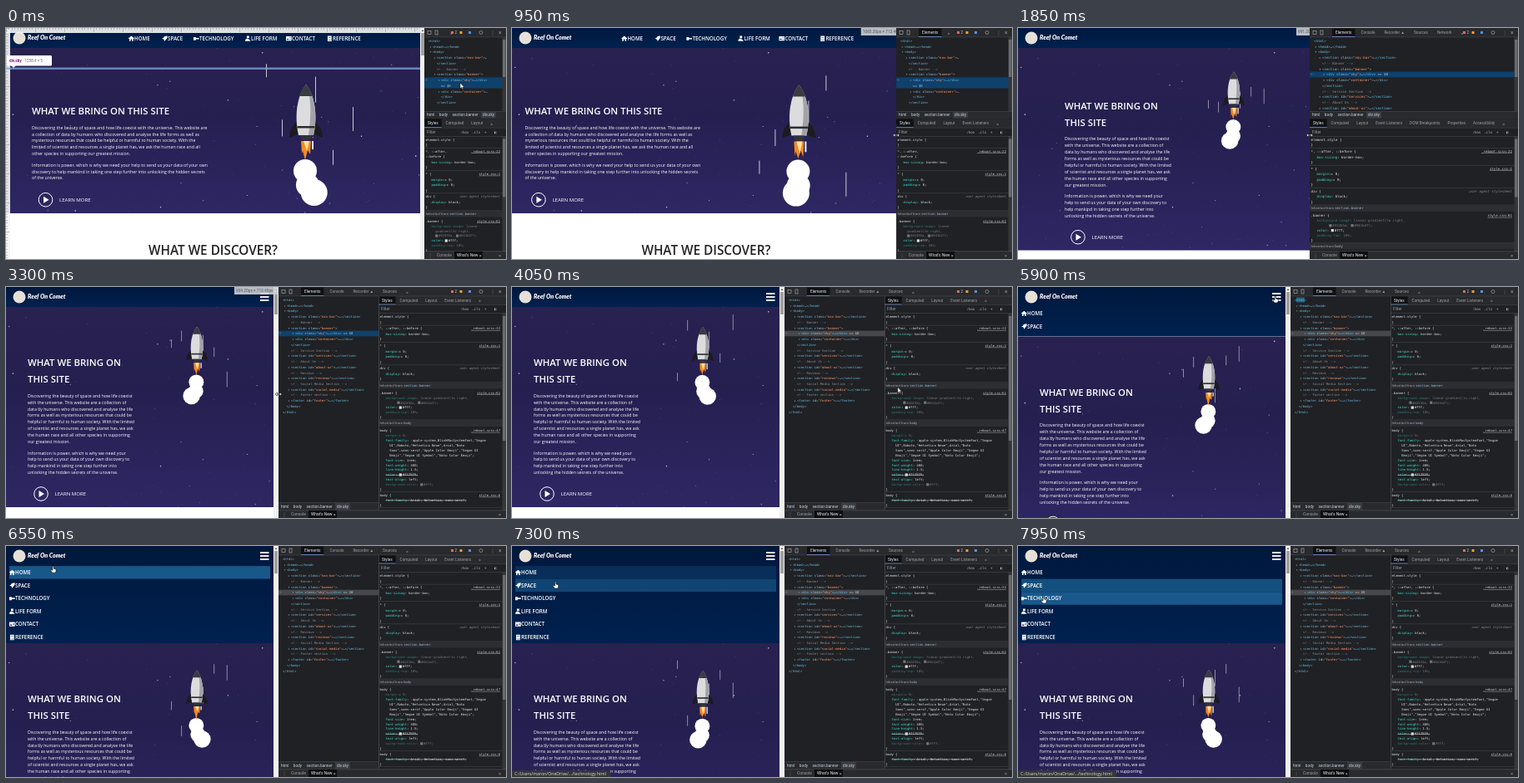
Recreate the animation shown at these times as an HTML page with a canvas. Size 600 by 278 pixels, loop 8 s.

```html
<!DOCTYPE html>
<html lang="en">
<head>
<meta charset="utf-8">
<title>Responsive space site</title>
<style>
html, body { margin: 0; width: 100%; height: 100%; overflow: hidden; background: #fff; }
canvas { display: block; width: 600px; height: 278px; }
</style>
</head>
<body>
<canvas id="stage"></canvas>
<script>
const LOOP = 8000, W = 600, H = 278;
const SANS = '"Open Sans", "Noto Sans", sans-serif';
const UI = 'Roboto, "Open Sans", sans-serif';
const MONO = '"DejaVu Sans Mono", monospace';
const canvas = document.getElementById('stage');
const c = canvas.getContext('2d');
const ratio = window.devicePixelRatio || 1;
canvas.width = W * ratio;
canvas.height = H * ratio;

// ---------- helpers ----------
const clamp = v => Math.max(0, Math.min(1, v));
const smooth = v => { v = clamp(v); return v * v * (3 - 2 * v); };
const during = (t, a, b) => t >= a && t < b;

function track(t, keys, ease = v => v) {
  if (t <= keys[0][0]) return keys[0][1];
  for (let i = 1; i < keys.length; i++) {
    const [t0, v0] = keys[i - 1], [t1, v1] = keys[i];
    if (t < t1) return v0 + (v1 - v0) * ease((t - t0) / (t1 - t0));
  }
  return keys[keys.length - 1][1];
}

function rect(x, y, w, h, fill) {
  c.fillStyle = fill;
  c.fillRect(x, y, w, h);
}

function circle(x, y, r, fill) {
  c.fillStyle = fill;
  c.beginPath();
  c.arc(x, y, r, 0, 7);
  c.fill();
}

function shape(path, fill) {
  c.fillStyle = fill;
  c.fill(new Path2D(path));
}

// Draws text centred on y and returns its width.
function text(s, x, y, font, fill, align = 'left') {
  c.font = font;
  c.fillStyle = fill;
  c.textAlign = align;
  c.textBaseline = 'alphabetic';
  c.fillText(s, x, y + parseFloat(font.match(/[\d.]+px/)) * .36);
  return c.measureText(s).width;
}

function clipped(x, y, w, h, draw) {
  c.save();
  c.beginPath();
  c.rect(x, y, w, h);
  c.clip();
  draw();
  c.restore();
}

let seed = 11;
const random = () => (seed = seed * 16807 % 2147483647) / 2147483647;
const stars = Array.from({ length: 170 }, () => ({
  x: random() * 500, y: random() * 245, r: .2 + random() ** 4 * .7, a: .3 + random() * .6
}));

// ---------- web page ----------
const NAV = ['HOME', 'SPACE', 'TECHNOLOGY', 'LIFE FORM', 'CONTACT', 'REFERENCE'];
const NAV_X = [147, 187, 225, 287, 336, 385];
const ICONS = [
  'M0 3L3.5 0L7 3V3.6H6V6.5H4.3V4.3H2.7V6.5H1V3.6H0Z',
  'M7 0Q3 0 2 2.5L0 3.2L2 4.2L3 5L3.7 7L4.7 5Q7 4 7 0Z',
  'M0 1.5H3V2.6H7V4.2H3V5.5H0Z',
  'M2 0H5V3H2ZM0 6.5Q0 3.5 3 3.5L5 4.5L7 6.5Z',
  'M0 .5H7V6H0ZM1 4.8H3.4V3.6H1ZM4.3 2V2.6H6V2ZM4.3 3.6V4.2H6V3.6Z',
  'M1 0H6V6.8H1ZM2 1.5V2.2H5V1.5ZM2 5.2V5.8H5.4V5.2Z'
];
const WIDE_COPY = [
  'Discovering the beauty of space and how life coexist with the universe. This website are|a collection of data by humans who discovered and analyse the life forms as well as|mysterious resources that could be helpful or harmful to human society. With the|limited of scientist and resources a single planet has, we ask the human race and all|other species in supporting our greatest mission.',
  'Information is power, which is why we need your help to send us your data of your own|discovery to help mankind in taking one step further into unlocking the hidden secrets|of the universe.'
];
const NARROW_COPY = [
  'Discovering the beauty of space and how life coexist|with the universe. This website are a collection of|data by humans who discovered and analyse the life|forms as well as mysterious resources that could be|helpful or harmful to human society. With the limited|of scientist and resources a single planet has, we ask|the human race and all other species in supporting|our greatest mission.',
  'Information is power, which is why we need your|help to send us your data of your own discovery to|help mankind in taking one step further into|unlocking the hidden secrets of the universe.'
];

function navItem(i, x, y) {
  c.save();
  c.translate(x, y - 3);
  c.scale(.95, .95);
  c.fillStyle = '#fff';
  c.fill(new Path2D(ICONS[i]), 'evenodd');
  c.restore();
  text(NAV[i], x + 7, y, `600 6.2px ${SANS}`, '#fff');
}

function rocket(x, y, scale, t) {
  const sway = Math.cos((t - 6550) / 1300 * 2 * Math.PI);
  const flick = Math.sin(t / 35) * 3;
  c.save();
  c.translate(x, y);
  c.scale(scale, scale);
  [312, 416, 392, 371, 331].forEach((lineX, i) => {
    const length = 16 + i * 13 % 24;
    const fall = (t / (520 + i * 90) + i * .37) % 1;
    rect(lineX - 360, fall * 140 - 25, 1, length, 'rgba(255,255,255,.75)');
  });
  circle(-1, 104, 14, '#fff');
  circle(10 * sway, 130, 16, '#fff');
  circle(2 * sway, 121, 14, '#fff');
  shape(`M-6 68H6L5 ${84 + flick}L2 79L-1 ${91 - flick}L-4 80L-5 ${83 + flick}Z`, '#f58a1f');
  shape(`M-3 68H4L1 ${80 + flick}Z`, '#ffe2a6');
  rect(7, 68, 2, 10 + flick, '#eee');
  shape('M-9 43Q-20 51 -20 64L-8 59ZM9 43Q20 51 20 64L8 59Z', '#1b1b20');
  shape('M0 0C-9 11 -15 34 -9 61H9C15 34 9 11 0 0Z', '#dcdcde');
  shape('M0 0C9 11 15 34 9 61H3C7 35 6 12 0 0Z', '#a2a2a8');
  shape('M0 0C-4 5 -6 9 -7.5 14H7.5C6 9 4 5 0 0Z', '#3a3a40');
  rect(-10.5, 50, 21, 2.5, '#2a2a30');
  shape('M-7 61H7L5 67H-5Z', '#333338');
  c.restore();
}

function copy(blocks, x, y) {
  for (const block of blocks) {
    for (const line of block.split('|')) {
      text(line, x, y, `5.2px ${SANS}`, '#fff');
      y += 7.93;
    }
    y += 5.4;
  }
}

function learnMore(x, y) {
  c.strokeStyle = '#fff';
  c.lineWidth = 1;
  c.beginPath();
  c.arc(x, y, 8.3, 0, 7);
  c.stroke();
  shape(`M${x - 2.5} ${y - 4}L${x + 4} ${y}L${x - 2.5} ${y + 4}Z`, '#fff');
  text('LEARN MORE', x + 16.5, y, `6.1px ${SANS}`, '#fff');
}

function sky(width, top, bottom) {
  const g = c.createLinearGradient(0, top, 0, bottom);
  g.addColorStop(0, '#292150');
  g.addColorStop(.4, '#251f50');
  g.addColorStop(1, '#2e2763');
  clipped(0, top, width, bottom - top, () => {
    rect(0, top, width, bottom - top, g);
    for (const s of stars) circle(s.x, top + s.y, s.r, `rgba(235,230,255,${s.a})`);
  });
}

function navBar(t, width, wide, menu) {
  const bottom = 24 + menu;
  const g = c.createLinearGradient(0, 0, 0, bottom);
  g.addColorStop(0, '#00183d');
  g.addColorStop(1, '#00214f');
  rect(0, 0, width, bottom, g);
  circle(16, 12, 7.5, '#e6e0d8');
  text('Reef On Comet', 26, 11.5, 'italic 900 7.1px Lato, sans-serif', '#fff');
  if (wide) {
    NAV_X.forEach((x, i) => navItem(i, x + (width - 497) / 2, 12.5));
    return;
  }
  for (const y of [8, 12, 16]) rect(width - 16, y - .9, 10.5, 1.8, '#fff');
  if (!menu) return;
  const spans = [[6400, 7150], [7200, 7880], [7800, 9999]];
  clipped(0, 24, width, menu, () => NAV.forEach((_, i) => {
    const y = 31.7 + i * 15.6;
    if (spans[i]) {
      const [from, to] = spans[i];
      const glow = clamp((t - from) / 200) * (1 - clamp((t - to) / 200));
      rect(4, y - 7.6, width - 8, 15.4, `rgba(38,122,176,${glow * .85})`);
    }
    navItem(i, 4, y);
  }));
}

function rulers(width) {
  rect(0, 0, width, 6, 'rgba(245,245,245,.9)');
  rect(0, 0, 5, H, 'rgba(245,245,245,.9)');
  for (let p = 0; p < width; p += 3.5) rect(p, 0, .5, p % 35 ? 2 : 5, '#8a8a8a');
  for (let p = 0; p < H; p += 3.5) rect(0, p, p % 35 ? 2 : 4, .5, '#8a8a8a');
}

function tooltip(x, y, width, name, size) {
  c.fillStyle = '#fff';
  c.beginPath();
  c.roundRect(x, y, width, 12.5, 1.5);
  c.fill();
  shape(`M${x + 5} ${y + 12}H${x + 11}L${x + 8} ${y + 15}Z`, '#fff');
  const w = text(name, x + 3, y + 6.3, `700 4.7px ${UI}`, '#881280');
  text(size, x + 7 + w, y + 6.3, `4.6px ${UI}`, '#666');
}

function page(t) {
  const width = track(t, [[620, 497], [1850, 381], [2750, 321]]);
  const wide = width > 415;
  const menu = 93 * track(t, [[5758, 0], [6098, 1]], smooth);
  const shift = wide ? (width - 497) / 2 : (width - 321) / 2;
  const lift = wide ? 0 : menu + shift * .09;
  const top = 24 + menu;
  const bottom = wide ? 223 : 265 + lift;

  rect(0, 0, width, H, '#fff');
  sky(width, top, bottom);
  const bob = Math.sin(t / 140) * 1.2;
  if (wide) {
    const x = 31 + shift;
    rocket(360 + shift, 68 + bob, 1, t);
    text('WHAT WE BRING ON THIS SITE', x, 100, `600 11.4px ${SANS}`, '#fff');
    copy(WIDE_COPY, x, 119.7);
    learnMore(47.5 + shift, 206.7);
    text('WHAT WE DISCOVER?', width / 2, 267, `600 15.3px ${SANS}`, '#222', 'center');
  } else {
    const x = 26 + shift;
    rocket(229 + shift, 49 + lift + 7 * smooth((t - 6000) / 500) + bob, .64, t);
    text('WHAT WE BRING ON', x, 91 + lift, `600 11.4px ${SANS}`, '#fff');
    text('THIS SITE', x, 111 + lift, `600 11.4px ${SANS}`, '#fff');
    copy(NARROW_COPY, x, 130.8 + lift);
    learnMore(x + 16, 249 + lift);
  }
  navBar(t, width, wide, menu);

  // Scrollbar
  rect(width, 0, 7, H, '#f1f1f1');
  rect(width + 1, 6, 4, 27, '#a0a0a0');
  shape(`M${width + 1.5} 4L${width + 3} 2L${width + 4.5} 4Z`, '#555');

  if (t < 600) {
    rulers(width);
    rect(0, 47.5, width, 2.5, 'rgba(125,170,220,.75)');
    tooltip(1, 33, 54, 'div.sky', '1258.4 × 5');
  } else if (during(t, 620, 3450)) {
    const x = width - 47;
    const size = Math.round(939.2 + (width - 321) * .867);
    rect(x, 0, 54, 9, 'rgba(205,207,212,.9)');
    text(`${size}.20px × 713.40px`, x + 2, 4.5, `4.8px ${UI}`, '#555');
  } else if (during(t, 4230, 5000)) {
    rect(0, 25, width, 16, '#76705f');
    rect(0, 41, width, 224, 'rgba(111,168,220,.68)');
    rulers(width);
    tooltip(2, 10, 77, 'section.banner', '819.2 × 618.95');
  }
  if (t > 7300) {
    rect(0, 270, 118, 8, '#35363a');
    text('C:/Users/maron/OneDrive/.../technology.html', 3, 274, `5.2px ${SANS}`, '#ddd');
  }
}

// ---------- developer tools ----------
const TREE = [
  [0, '<html>'], [1, '▸<head>…</head>'], [1, '▾<body>'],
  [2, '▸<section class="nav-bar">…</section>'], [2, '<!-- Banner -->'],
  [2, '▾<section class="banner">'], [3, '▸<div class="sky">…</div> == $0'],
  [3, '▸<div class="container">…</div>'], [2, '</section>'],
  [2, '<!-- Service Section -->'], [2, '▸<section id="services">…</section>'],
  [2, '<!-- About Us -->'], [2, '▸<section id="about-us">…</section>'],
  [2, '<!-- Reviews -->'], [2, '▸<section id="reviews">…</section>'],
  [2, '<!-- Social Media Section -->'], [2, '▸<section id="social-media">…</section>'],
  [2, '<!-- Footer section -->'], [2, '▸<footer id="footer">…</footer>'],
  [1, '</body>'], [0, '</html>']
];
const SLIM_TREE = [
  ...TREE.slice(0, 3), [2, '▸<section class="nav-bar">…'], [2, '</section>'],
  ...TREE.slice(4, 6), [3, '▸<div class="sky">…</div>'], [3, '== $0'],
  [3, '▸<div class="container">…'], [3, '</div>'], [2, '</section>']
];

// Each rule: source link, then lines; "~" marks dimmed and "-" struck lines.
function styleRules(slim) {
  return [
    ['', 'element.style {', '}'],
    ['_reboot.scss:22', ...(slim ? ['*, ::after,', '::before {'] : ['*, ::after, ::before {']),
      'box-sizing: border-box;', '}'],
    ['style.css:1', '* {', 'margin:▸ 0;', 'padding:▸ 0;', '}'],
    ['user agent stylesheet', 'div {', 'display: block;', '}'],
    'section.banner',
    ['style.css:61', '.banner {',
      ...(slim ? ['~background-image: linear-', '~  gradient(to right,', '~  ■#42455a, ■#041b47);']
        : ['~background-image: linear-gradient(to right,', '~      ■#42455a, ■#041b47);']),
      'color: ■#fff;', '~padding-top: 10%;', '}'],
    'body',
    ['_reboot.scss:47', 'body {', '~margin:▸ 0;',
      'font-family: -apple-system,BlinkMacSystemFont,"Segoe', '  UI",Roboto,"Helvetica Neue",Arial,"Noto',
      '  Sans",sans-serif,"Apple Color Emoji","Segoe UI', '  Emoji","Segoe UI Symbol","Noto Color Emoji";',
      'font-size: 1rem;', 'font-weight: 400;', 'line-height: 1.5;', '-color: ■#212529;',
      'text-align: left;', '~background-color: ■#fff;', '}'],
    ['style.css:6', 'body {', '-font-family: Arial, Helvetica, sans-serif;', '}']
  ];
}

function treeLine(line, x, y, size) {
  const arrow = /^[▸▾]/.test(line);
  if (arrow) text(line[0], x - 3.6, y, `${size}px ${MONO}`, '#9aa0a6');
  const parts = line.slice(arrow ? 1 : 0).split(/(<!--.*-->|"[^"]*"|(?:class|id)(?==)|…|== \$0)/);
  for (const part of parts) {
    const colour = part.startsWith('<!') ? '#898e93' : part[0] === '"' ? '#ffa074'
      : /^(class|id)$/.test(part) ? '#a9c9ea' : /^(…|==)/.test(part) ? '#cdd1d5' : '#66c0e8';
    x += text(part, x, y, `${size}px ${MONO}`, colour);
  }
}

function elementsPane(t, x, right, bottom, slim, size) {
  clipped(x, 11, right - x, bottom - 11, () => {
    (slim ? SLIM_TREE : TREE).forEach(([depth, line], i) => {
      const y = 15.5 + i * 6.74;
      if (line.includes('"sky"')) {
        rect(x, y - 3.3, right - x, slim ? 13.2 : 6.7, t < 3450 ? '#0e416c' : '#46484c');
        text('⋯', x + 1, y, `4px ${MONO}`, '#aaa');
      }
      if (!i && during(t, 5550, 6050)) rect(x + 7, y - 3, 10, 6, '#24617f');
      treeLine(line, x + 5 + depth * 5, y, size);
    });
  });
}

function styleLine(raw, x, y, size) {
  const mark = /^[~-]/.test(raw) ? raw[0] : '';
  const line = raw.slice(mark.length);
  const font = `${size}px ${MONO}`;
  const isProperty = /^[a-z-]+:/.test(line);
  const start = x + (isProperty || line.startsWith('  ') ? 7 : 0);
  let at = start;
  c.globalAlpha = mark === '~' ? .45 : 1;
  for (const part of line.split(/(^[a-z-]+(?=:)|■)/)) {
    if (part === '■') {
      rect(at, y - 1.6, 3.2, 3.2, '#ddd');
      at += 4;
    } else {
      at += text(part, at, y, font, isProperty && /^[a-z-]+$/.test(part) ? '#3fe0d2' : '#e4e6e9');
    }
  }
  if (mark === '-') rect(start, y, at - start, .5, '#ccc');
  c.globalAlpha = 1;
}

function stylesPane(t, x, y, bottom, slim, size) {
  clipped(x, y - 5, W - x, bottom - y + 5, () => {
    let inherited = false;
    for (const rule of styleRules(slim)) {
      if (typeof rule === 'string') {
        inherited = true;
        rect(x, y - 4, W - x, 8, '#2d2e31');
        const w = text('Inherited from ', x + 1.5, y, `4.4px ${UI}`, '#9aa0a6');
        const name = text(rule, x + 1.5 + w, y, `${size}px ${MONO}`, '#9bbbdc');
        if (rule !== 'body' && during(t, 4230, 5000)) rect(x + 1.5 + w, y + 2, name, .4, '#9bbbdc');
        y += 9;
        continue;
      }
      const [link, ...lines] = rule;
      const agent = link.startsWith('user');
      const w = text(link, W - 7, y, `${agent ? 'italic ' : ''}${size}px ${MONO}`, agent ? '#85898d' : '#d0d2d5', 'right');
      if (link && !agent) rect(W - 7 - w, y + 2, w, .4, '#d0d2d5');
      for (const line of lines) {
        styleLine(line, x + 1.5, y, size);
        y += inherited ? 5.9 : 6.5;
      }
      y += 1.1;
      rect(x, y - 4.2, W - x, .5, '#44474b');
    }
  });
}

function paneScrollbar(top, bottom, thumb) {
  rect(595.5, top, 4.5, bottom - top, '#35363a');
  rect(596, top + 3, 3.5, thumb, '#6a6b6e');
}

function tabs(names, x, y, limit, gap) {
  for (const [i, name] of names.entries()) {
    c.font = `4.7px ${UI}`;
    const w = c.measureText(name).width;
    if (x + w > limit) break;
    if (!i) {
      rect(x - 4, y - 5, w + 8, 10, '#101113');
      rect(x - 4, y + 4.6, w + 8, .7, '#7cacf8');
    }
    text(name, x, y, `4.7px ${UI}`, i ? '#9aa0a6' : '#e8eaed');
    x += w + gap;
  }
  text('»', x, y, `6px ${UI}`, '#9aa0a6');
}

function crumbs(x, y, right) {
  rect(x, y - 4.5, right - x, 9, '#292a2d');
  rect(x, y - 4.5, right - x, .5, '#494c50');
  let at = x + 3;
  for (const name of ['html', 'body', 'section.banner', 'div.sky']) {
    c.font = `4.7px ${UI}`;
    const w = c.measureText(name).width;
    if (name === 'div.sky') rect(at - 2, y - 4, w + 4, 8, '#3b3d41');
    text(name, at, y, `4.7px ${UI}`, '#c4d5e8');
    at += w + 5.5;
  }
}

function devtools(t) {
  const x = track(t, [[620, 502], [1850, 350], [2750, 327]]);
  const width = W - x, slim = width < 160, stacked = width < 260;
  const size = stacked && !slim ? 4.1 : 3.85;
  const split = stacked ? x : x + 120;
  const headY = stacked ? 114.5 : 16;

  rect(x, 0, width, H, '#202124');
  elementsPane(t, x, stacked ? W : split, stacked ? 100 : 260, slim, size);
  stylesPane(t, split, headY + 20, 269, slim, size);
  if (stacked) paneScrollbar(11, 100, 45);
  paneScrollbar(headY + 16, 269, stacked ? 70 : 150);

  rect(split, headY - 5, W - split, 10, '#292a2d');
  tabs(['Styles', 'Computed', 'Layout', 'Event Listeners', 'DOM Breakpoints', 'Properties', 'Accessibility'],
    split + 4, headY, 585, 9);
  rect(split, headY + 5.3, W - split, .5, '#494c50');
  text('Filter', split + 3, headY + 10.5, `4.7px ${UI}`, '#9aa0a6');
  [[545, ':hov'], [559, '.cls'], [574, '+'], [586, '◧']].forEach(([px, s]) =>
    text(s, px, headY + 10.5, `4.3px ${MONO}`, '#b4b8bc'));
  rect(split, headY + 15.5, W - split, .5, '#494c50');
  crumbs(x, stacked ? 104.5 : 264, stacked ? W : split);
  if (!stacked) rect(split, 11, .6, 257, '#55585c');

  // Main toolbar
  rect(x, 0, width, 11, '#292a2d');
  rect(x, 10.7, width, .5, '#494c50');
  c.strokeStyle = '#9aa0a6';
  c.lineWidth = .7;
  c.strokeRect(x + 4, 3.5, 4, 4);
  c.strokeRect(x + 13, 3, 3, 5);
  tabs(['Elements', 'Console', 'Recorder ▲', 'Sources', 'Network'], x + 31, 5.5, stacked ? 527 : 480, 11);
  ['#e46962', '#f29f3d', '#5495e8'].forEach((colour, i) => rect(534 + i * 10.5, 4, 3, 3, colour));
  text('2', 538.5, 5.5, `4.6px ${UI}`, '#bbb');
  c.beginPath();
  c.arc(570, 5.5, 2, 0, 7);
  c.stroke();
  text('⋮', 581, 5.5, `6px ${MONO}`, '#9aa0a6');
  text('×', 591, 5.5, `7px ${UI}`, '#9aa0a6');

  // Drawer
  rect(x, 269, width, 9, '#292a2d');
  rect(x, 268.6, width, .6, '#55585c');
  text('⋮', x + 4, 273.7, `6px ${MONO}`, '#9aa0a6');
  text('Console', x + 15, 273.7, `4.9px ${UI}`, '#9aa0a6');
  rect(x + 36, 269, 34, 9, '#0d0e10');
  text("What's New", x + 39, 273.7, `4.9px ${UI}`, '#e8eaed');
  text('×', x + 66, 273.7, `5px ${UI}`, '#ccc');
  text('×', 591, 273.7, `6px ${UI}`, '#9aa0a6');
  return x;
}

// ---------- pointer ----------
const PATH_X = [[0, 545], [600, 502], [1850, 350], [2750, 327], [3500, 327], [4230, 487], [4900, 487],
  [5500, 309], [5950, 309], [6450, 57], [7150, 55], [7900, 31]];
const PATH_Y = [[0, 66], [600, 129], [3500, 129], [4230, 119], [4900, 119], [5500, 14], [5950, 14],
  [6450, 27], [7100, 29], [7300, 46], [7700, 50], [7900, 64]];

function pointer(t, divider) {
  const resizing = during(t, 600, 3500);
  const x = resizing ? divider : track(t, PATH_X, smooth);
  const y = track(t, PATH_Y, smooth);
  c.save();
  c.translate(x, y);
  c.strokeStyle = '#111';
  c.lineWidth = .6;
  const path = new Path2D(
    resizing ? 'M-4 0L-1.5 -2V-.6H1.5V-2L4 0L1.5 2V.6H-1.5V2Z'
      : t > 5400 || during(t, 4200, 4950) ? 'M-1 -3H.4V0L3.2 .8V3.2L2.2 5H-1.2L-3.2 2V1L-1 2Z'
      : 'M0 0V7L1.7 5.5L2.8 8L3.8 7.5L2.8 5.2H5Z');
  c.fillStyle = '#fff';
  c.fill(path);
  c.stroke(path);
  c.restore();
}

function frame(now) {
  const t = now % LOOP;
  c.setTransform(ratio, 0, 0, ratio, 0, 0);
  page(t);
  pointer(t, devtools(t));
  requestAnimationFrame(frame);
}
requestAnimationFrame(frame);
</script>
</body>
</html>
```
